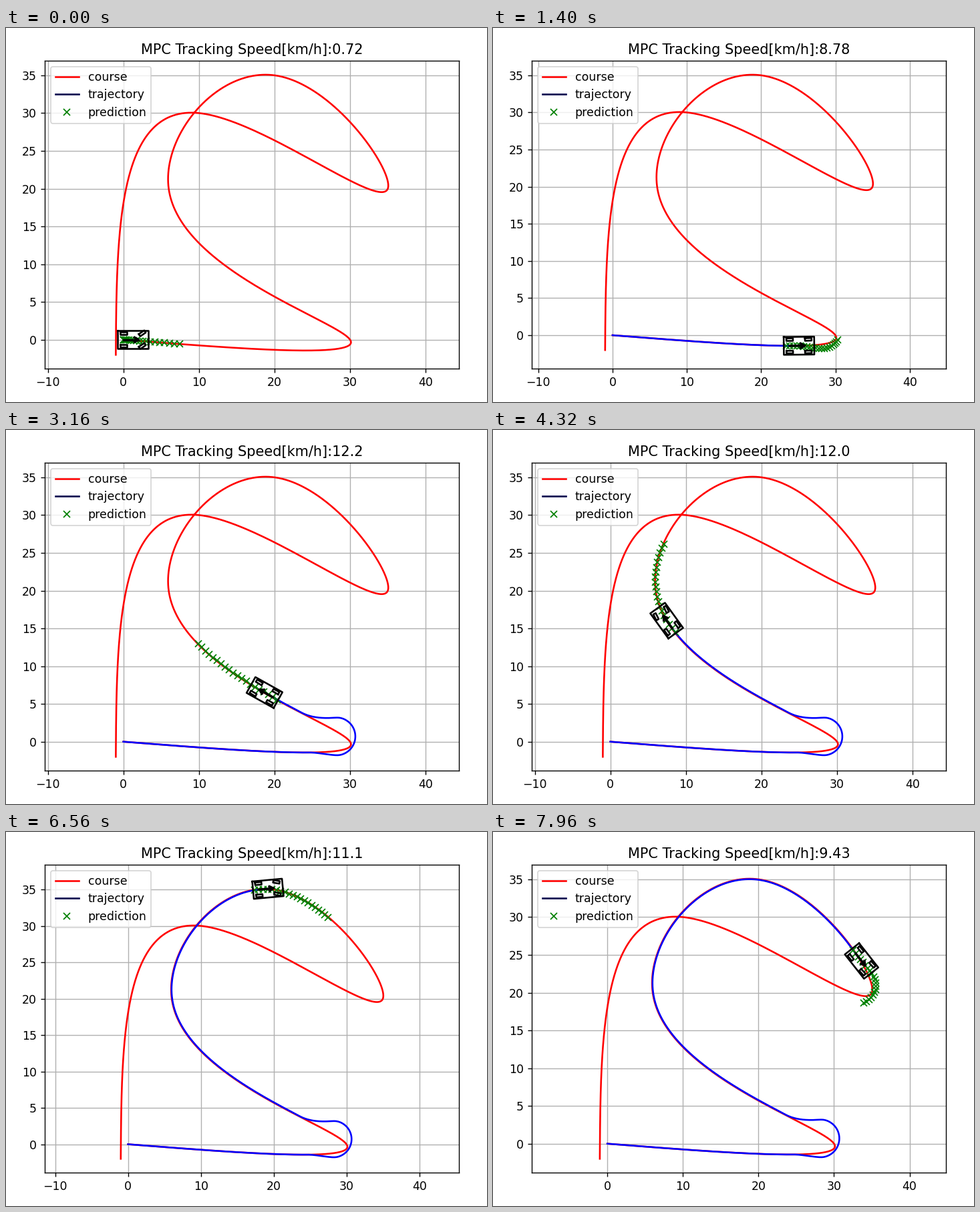
A matplotlib script that plays this animation: 720x560 px, repeating every 8 s.

```python
import numpy as np
import matplotlib.pyplot as plt
from matplotlib.animation import FuncAnimation

W, H, DPI = 720, 560, 125
AX_W, AX_H = 620, 461.3
FRAMES, INTERVAL = 200, 40
HORIZON = 19
DT = 0.2

# vehicle, in metres
FRONT, REAR, WIDTH = 3.3, 0.8, 2.4
BASE, TRACK, TIRE_R, TIRE_W = 2.5, 1.68, 0.44, 0.7
MIN_RADIUS = 2.5


def spline(points, ds):
    """Natural cubic spline through points, parametrised by chord length."""
    p = np.asarray(points, float)
    n = len(p)
    h = np.hypot(*np.diff(p, axis=0).T)
    u = np.r_[0, np.cumsum(h)]
    a, b = np.eye(n), np.zeros((n, 2))
    for i in range(1, n - 1):
        a[i, i - 1:i + 2] = h[i - 1], 2 * (h[i - 1] + h[i]), h[i]
        b[i] = 6 * ((p[i + 1] - p[i]) / h[i] - (p[i] - p[i - 1]) / h[i - 1])
    m = np.linalg.solve(a, b)
    t = np.append(np.arange(0, u[-1], ds), u[-1])
    i = np.clip(np.searchsorted(u, t, side="right") - 1, 0, n - 2)
    l, r, hi = (u[i + 1] - t)[:, None], (t - u[i])[:, None], h[i][:, None]
    out = (m[i] * l**3 + m[i + 1] * r**3) / (6 * hi)
    out += (p[i] / hi - m[i] * hi / 6) * l + (p[i + 1] / hi - m[i + 1] * hi / 6) * r
    return out


def tight_turn(x, y, start, end):
    """Arc driven at full lock, angles in degrees."""
    a = np.radians(np.linspace(start, end, 11))
    return np.c_[x + MIN_RADIUS * np.cos(a), y + MIN_RADIUS * np.sin(a)]


course = spline([(0, 0), (30, 0), (6, 20), (20, 35), (35, 20), (10, 30), (-1, -2)], 0.1)
cx, cy = course.T


def driven_path():
    """Follows the course, but swings wide at the two hairpins."""
    leave = np.argmax(cx > 25.2)
    tip = np.argmax(cx[:500])
    rejoin = tip + np.argmax(cx[tip:] < 24)
    top = np.argmax(cy)
    last = top + np.argmax(cy[top:] < 25.2)
    dx, dy = np.gradient(course, axis=0).T
    inside = course + 0.06 * np.c_[dy, -dx] / np.hypot(dx, dy)[:, None]
    return spline(np.vstack([
        course[:leave:10], tight_turn(28.2, 0.7, -100, 100),
        inside[rejoin:last:10], tight_turn(33.05, 20.95, 40, -100)]), 0.05)


path = driven_path()
arc_len = np.r_[0, np.cumsum(np.hypot(*np.diff(path, axis=0).T))]
heading = np.unwrap(np.arctan2(np.gradient(path[:, 1]), np.gradient(path[:, 0])))
curvature = np.gradient(heading, arc_len)
curvature = np.convolve(np.pad(curvature, 10, mode="edge"), np.ones(21) / 21, "valid")


def along(s, values):
    return np.interp(s, arc_len, values)


def place(s):
    return along(s, path[:, 0]), along(s, path[:, 1])


# seconds, x, y, km/h
KEYS = np.array([
    (0, 0, 0, 0.7201), (0.49, 5.42, -0.42, 12.25), (1.4, 23.85, -1.4, 8.785),
    (2, 30.14, -0.87, 5.025), (3.16, 19.76, 5.9, 12.25), (5.44, 7.66, 27.35, 11.55),
    (6.56, 17.95, 34.93, 11.15), (7.96, 32.83, 25.17, 9.435), (8.8, 33.6, 18.45, 7)])
key_t = KEYS[:, 0]
key_v = KEYS[:, 3] / 3.6 * DT
key_s = np.array([arc_len[np.argmin(np.hypot(*(path - xy).T))] for xy in KEYS[:, 1:3]])
# control steps needed between keys at their mean speed
key_k = np.r_[0, np.cumsum(np.round(np.diff(key_s) * 2 / (key_v[1:] + key_v[:-1])))]


def travel(k):
    """Distance and distance per step at control step k."""
    k = np.clip(k, 0, key_k[-1])
    i = np.clip(np.searchsorted(key_k, k, side="right") - 1, 0, len(key_k) - 2)
    h = key_k[i + 1] - key_k[i]
    t = (k - key_k[i]) / h
    s0, s1, v0, v1 = key_s[i], key_s[i + 1], key_v[i] * h, key_v[i + 1] * h
    a, b = 2 * (s0 - s1) + v0 + v1, 3 * (s1 - s0) - 2 * v0 - v1
    return ((a * t + b) * t + v0) * t + s0, ((3 * a * t + 2 * b) * t + v0) / h


def turn(pts, a):
    c, s = np.cos(a), np.sin(a)
    return np.array([[c, -s], [s, c]]) @ pts


def box(x0, x1, half):
    return np.array([[x0, x0, x1, x1, x0], [half, -half, -half, half, half]], float)


def car_shapes(x, y, yaw, steer):
    """Body, four wheels, arrow shaft and arrow head."""
    tire = box(-TIRE_R, TIRE_R, TIRE_W / 4)
    parts = [box(-REAR, FRONT, WIDTH / 2)]
    for side in (-TRACK / 2, TRACK / 2):
        parts.append(turn(tire, steer) + [[BASE], [side]])
        parts.append(tire + [[0], [side]])
    tip = 0.8 * BASE
    bx, by = 0.3 * tip * np.cos(np.pi / 6), 0.3 * tip * np.sin(np.pi / 6)
    parts.append(np.array([[0, tip], [0, 0]]))
    parts.append(np.array([[tip - bx, tip, tip - bx], [by, 0, -by]]))
    return [turn(p, yaw) + [[x], [y]] for p in parts]


fig = plt.figure(figsize=(W / DPI, H / DPI), dpi=DPI, facecolor="white")
ax = fig.add_axes([58.3 / W, 49.7 / H, AX_W / W, AX_H / H])
ax.grid(True)
ax.plot(cx, cy, "-r", label="course")
trail, = ax.plot([], [], "-b", label="trajectory")
marks, = ax.plot([], [], "xg", label="prediction")
car = [ax.plot([], [], "k", lw=1.5 if i < 5 else 2)[0] for i in range(7)]
legend = ax.legend(loc="upper left")
legend.get_lines()[1].set_color("#00004c")
title = ax.set_title("")


def fit(xs, ys):
    """Equal scale, 5 % margin on y, x centred on the data."""
    lo, hi = ys.min(), ys.max()
    pad = 0.05 * (hi - lo)
    ax.set_ylim(lo - pad, hi + pad)
    half = (hi - lo + 2 * pad) * AX_W / AX_H / 2
    mid = (xs.min() + xs.max()) / 2
    ax.set_xlim(mid - half, mid + half)


def draw(frame):
    k = np.ceil(np.interp(frame * INTERVAL / 1000, key_t, key_k) - 1e-6)
    s, v = travel(k)
    x, y = place(s)
    # starts level with the wheels turned, then settles onto the path
    yaw = along(s, heading) * min(1, s / 1.5)
    steer = np.arctan(BASE * along(s, curvature)) + 0.6 * np.exp(-k)

    done = path[arc_len < s]
    trail.set_data(np.append(done[:, 0], x), np.append(done[:, 1], y))
    ahead = place(travel(k - 1 + np.arange(HORIZON + 1))[0])
    marks.set_data(*ahead)
    shapes = car_shapes(x, y, yaw, steer)
    for line, shape in zip(car, shapes):
        line.set_data(*shape)

    fit(*np.hstack([course.T, ahead] + shapes))
    title.set_text("MPC Tracking Speed[km/h]:" + f"{v / DT * 3.6:.5f}"[:4])
    return [trail, marks, title] + car


anim = FuncAnimation(fig, draw, frames=FRAMES, interval=INTERVAL,
                     repeat=True, repeat_delay=0, blit=False)
plt.show()
```
